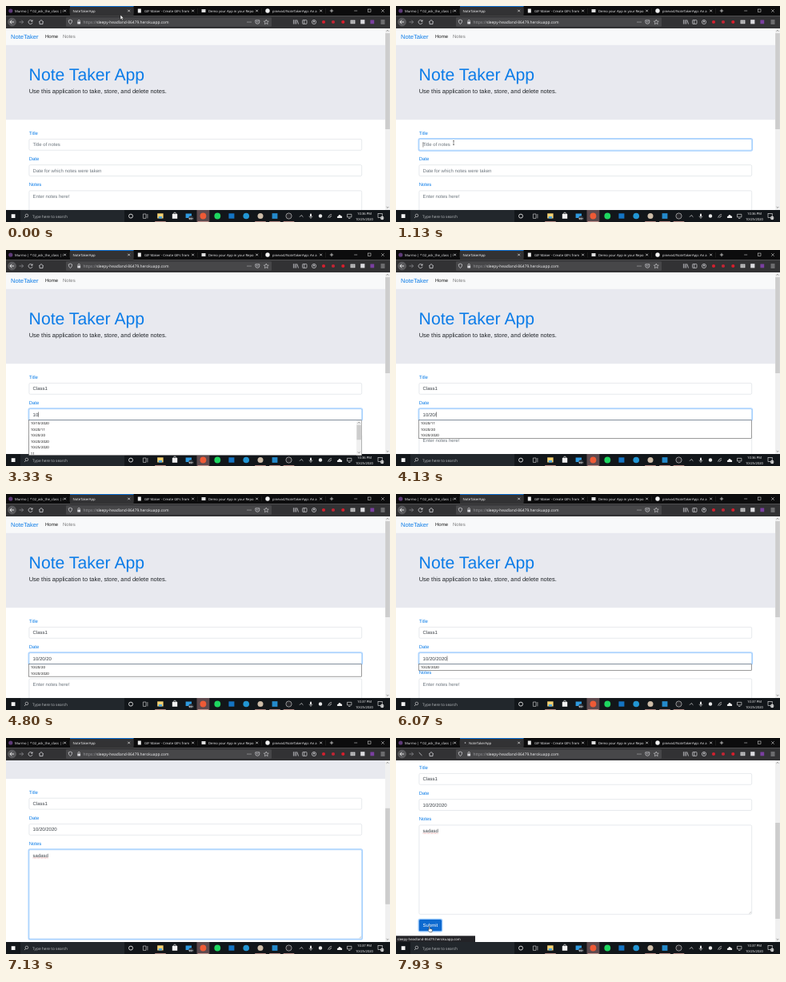
An HTML page for the animation above (8000 ms loop, 480 by 270 pixels).

```html
<!DOCTYPE html>
<html lang="en">
<head>
<meta charset="utf-8">
<title>Note Taker App</title>
<style>
  html, body { margin: 0; width: 100%; height: 100%; overflow: hidden; background: #fff; }
  svg { display: block; width: 100vw; height: 100vh; }
  text { font-family: "Liberation Sans", Arial, sans-serif; text-rendering: geometricPrecision; white-space: pre; }
  .ui { font-family: "Open Sans", "Noto Sans", sans-serif; }
</style>
</head>
<body>
<svg viewBox="0 0 480 270" xmlns="http://www.w3.org/2000/svg">
  <defs><clipPath id="view"><rect y="28" width="480" height="227"/></clipPath></defs>
  <g clip-path="url(#view)"><g id="page"></g></g>
  <g id="frame"></g>
  <g id="overlay"></g>
</svg>
<script>
const LOOP = 8000;
const BLUE = '#0b7ce8', TOOLBAR = '#323234', ICON = '#d7d7db';
const $ = id => document.getElementById(id);

// Drawing helpers
const rect = (x, y, w, h, fill, more = '') =>
  `<rect x="${x}" y="${y}" width="${w}" height="${h}" fill="${fill}" ${more}/>`;
const circle = (x, y, r, fill, more = '') => `<circle cx="${x}" cy="${y}" r="${r}" fill="${fill}" ${more}/>`;
const line = (d, color = ICON, width = 0.7, more = '') =>
  `<path d="${d}" fill="none" stroke="${color}" stroke-width="${width}" ${more}/>`;
const shape = (d, fill, more = '') => `<path d="${d}" fill="${fill}" ${more}/>`;
const text = (x, y, str, size, fill, more = '') =>
  `<text x="${x}" y="${y}" font-size="${size}" fill="${fill}" ${more}>${str}</text>`;
const ui = (x, y, str, size, fill, more = '') => text(x, y, str, size, fill, `class="ui" ${more}`);
const cross = (x, y, r, color, width) =>
  line(`M${x - r} ${y - r}l${2 * r} ${2 * r}m0 ${-2 * r}l${-2 * r} ${2 * r}`, color, width);

const pen = document.createElement('canvas').getContext('2d');
pen.font = '60px "Liberation Sans", Arial, sans-serif';
const textWidth = str => pen.measureText(str).width / 10;

// Timeline
const FIELDS = [
  { label: 'Title', hint: 'Title of notes', word: 'Class1', height: 14.25, lag: 0,
    keys: [1530, 1600, 1730, 1800, 1930, 2270], focus: [1070, 2630],
    history: ['Class', 'class', 'Class1'] },
  { label: 'Date', hint: 'Date for which notes were taken', word: '10/20/2020', height: 14.25, lag: 105,
    keys: [2870, 3300, 3530, 3730, 3870, 4000, 4200, 4270, 5000, 5070], focus: [2630, 6140],
    history: ['10/10/2020', '10/20/11', '10/20/20', '10/20/2020', '10/25/2020', '11'] },
  { label: 'Notes', hint: 'Enter notes here!', word: 'sadasd', height: 111.8,
    keys: [6270, 6330, 6400, 6470, 6530, 6600], focus: [6140, 7800] },
];
const CARET_OFF = [[2070, 2270], [4770, 5000], [5330, 5730], [6880, 7400]];
const POINTER = [
  [[0, 143, 11], [270, 143, 11], [400, 114, 129], [600, 114, 129], [950, 72, 171], [1530, 72, 171]],
  [[5530, 163, 82], [5730, 163, 82], [6065, 110, 222]],
  [[7470, 112, 150], [7720, 40, 235.3], [8000, 40, 235.3]],
];
const SUBMIT_AT = 7800, HOVER_AT = 7680, LOADING_AT = 7860, MINUTE_AT = 4400;

const within = (t, [from, to]) => t >= from && t < to;
const ease = p => p * p * (3 - 2 * p);
const clamp = p => Math.max(0, Math.min(1, p));
const scrollAt = t => 122 * ease(clamp((t - 6728) / 600));
const typed = (field, t) => field.word.slice(0, field.keys.filter(k => k <= t).length);

function pointerAt(t) {
  const path = POINTER.find(p => within(t, [p[0][0], p.at(-1)[0]]));
  if (!path) return null;
  const i = path.findIndex(p => p[0] > t);
  const [t0, x0, y0] = path[i - 1], [t1, x1, y1] = path[i];
  const p = ease((t - t0) / (t1 - t0));
  return [x0 + (x1 - x0) * p, y0 + (y1 - y0) * p];
}

// Web page
const fieldTop = i => 166.2 + 32.25 * i;

function drawField(field, i, t) {
  const top = fieldTop(i), value = typed(field, t), focused = within(t, field.focus);
  const base = top + 9.2;
  let out = text(28.7, top - 5.4, field.label, 6, BLUE);
  if (focused) out += rect(28.1, top - 0.6, 417.4, field.height + 1.2, 'none',
    'rx="2" stroke="#007bff" stroke-opacity=".32" stroke-width="1.2"');
  out += rect(28.9, top + 0.2, 415.8, field.height - 0.4, '#fff',
    `rx="1.5" stroke="${focused ? '#6db2fa' : '#ced4da'}" stroke-width=".5"`);
  out += text(33.6, base, value || field.hint, 6, value ? '#3c4248' : '#6c757d');
  if (focused && !CARET_OFF.some(span => within(t, span)))
    out += rect(33.7 + textWidth(value), top + 4, 0.5, 6.3, '#222');
  if (i === 2) {
    const bottom = top + field.height;
    out += line(`M441.5 ${bottom - 1}l2.5 -2.5m-1.2 2.5l1.2 -1.2`, '#888', 0.35);
    if (t > 7000) out += line(`M33.6 ${base + 1.2}h${textWidth(value)}`, '#c44', 0.5, 'stroke-dasharray=".8 .5"');
  }
  return out;
}

function drawPage(t) {
  const top = 349;
  return rect(0, 28, 474, 400, '#fff') +
    rect(0, 28, 474, 20.7, '#f8f9fa') +
    text(6, 41, 'NoteTaker', 7.55, BLUE) +
    text(49, 40.4, 'Home', 6, 'rgba(0,0,0,.9)') +
    text(71, 40.4, 'Notes', 6, 'rgba(0,0,0,.5)') +
    rect(0, 48.7, 474, 93.5, '#e8e9ef') +
    text(28.6, 92.8, 'Note Taker App', 21.2, BLUE) +
    text(28.7, 109.2, 'Use this application to take, store, and delete notes.', 7.5, '#212529') +
    FIELDS.map((f, i) => drawField(f, i, t)).join('') +
    (t >= SUBMIT_AT ? rect(28.1, top - 0.6, 29.6, 15.4, 'none', 'rx="2" stroke="#99caff" stroke-width="1.2"') : '') +
    rect(28.7, top, 28.4, 14.25, t >= HOVER_AT ? '#0d69cf' : BLUE, 'rx="1.5"') +
    text(42.9, top + 9.2, 'Submit', 6, '#fff', 'text-anchor="middle"');
}

function drawSuggestions(t) {
  return FIELDS.map((field, i) => {
    if (!field.history || !within(t, [field.keys[0], field.focus[1]])) return '';
    const query = typed(field, t - field.lag).toLowerCase();
    const rows = field.history.filter(h => h.toLowerCase().startsWith(query));
    const top = fieldTop(i) + 14.3, height = Math.min(rows.length * 7.5 + 0.4, 44);
    let out = rect(28.6, top, 416, height, '#fff', 'stroke="#4a4a4a" stroke-width=".55"');
    rows.forEach((row, n) => out += ui(30.8, top + 5.7 + 7.5 * n, row, 4.35, '#000'));
    if (rows.length > 5) out += rect(438, top + 0.3, 6.3, height - 0.6, '#f0f0f0') +
      rect(438.4, top + 6, 5.5, 18.5, '#cdcdcd') +
      line(`M439.8 ${top + 3.8}l1.4 -1.4l1.4 1.4M439.8 ${top + 39.6}l1.4 1.4l1.4 -1.4`, '#555', 0.6);
    return out;
  }).join('');
}

// Browser window and taskbar
const TABS = [
  ['Murmo | * 02_ask_the_class | H', circle(5.8, 6, 2.6, '#5d3a78')],
  ['NoteTakerApp', ''],
  ['GIF Maker - Create GIFs from', rect(164.8, 3.5, 4, 5, '#eee')],
  ['Demo your App in your Repo', rect(244.5, 4, 5, 4, '#ddd')],
  ['pinevo4/NoteTakerApp: An a', circle(327, 6, 2.7, '#f4f4f4')],
];

function drawBrowser() {
  let out = rect(0, 0, 480, 12.2, '#0c0c0d') + rect(0, 12.2, 480, 15.8, TOOLBAR) +
    rect(80, 0, 79.5, 12.5, TOOLBAR) + rect(80, 0, 79.5, 0.8, '#0a84ff');
  TABS.forEach(([title, icon], i) => {
    const x = 80 * i;
    if (i !== 1) out += icon + ui(x + (i ? 13 : 11), 7.6, title, 4.2, '#f2f2f4');
    out += rect(x + 71.5, 2, 7, 8, i === 1 ? TOOLBAR : '#0c0c0d') + cross(x + 73.6, 6, 1.3, '#eee', 0.7) +
      rect(x + 79.6, 3, 0.3, 6.5, '#444');
  });
  out += line('M404.8 6h4.4m-2.2 -2.2v4.4', '#eee') + line('M435.2 6h4', '#eee', 0.5) +
    rect(452.4, 4, 3.6, 3.6, 'none', 'stroke="#eee" stroke-width=".5"') + cross(471, 6, 1.8, '#eee', 0.5);

  // Navigation buttons and address
  out += circle(7.5, 20, 5, '#58585b', 'stroke="#77777a" stroke-width=".4"') +
    line('M10 20h-5m2.2 -2.3l-2.3 2.3l2.3 2.3', '#fff', 0.8) +
    line('M16.5 20h5m-2.2 -2.3l2.3 2.3l-2.3 2.3', '#8c8c90', 0.8) +
    line('M41 20.2l3 -2.7l3 2.7m-5 -.6v3h4v-3', ICON, 0.8) +
    rect(75, 14.2, 257, 11.6, '#474749', 'rx="1"') +
    line('M78.2 18l2.2 -.8l2.2 .8q0 3.4 -2.2 4.7q-2.2 -1.3 -2.2 -4.7z') +
    rect(89.3, 19.4, 3.8, 3, ICON, 'rx=".4"') + line('M90 19.5v-1q0 -1.1 1.2 -1.1t1.2 1.1v1') +
    ui(96.6, 21.7, 'https://<tspan fill="#f9f9fa">sleepy-headland-86479.herokuapp.com</tspan>', 4.9, '#a4a4a8') +
    [302, 304, 306].map(x => circle(x, 20, 0.55, ICON)).join('') +
    line('M311.8 17.8h5v2q0 2.5 -2.5 2.5t-2.5 -2.5zm1.2 1.2l1.3 1.2l1.3 -1.2') +
    shape('M325.3 17l.9 2l2.1 .2l-1.6 1.4l.5 2.1l-1.9 -1.1l-1.9 1.1l.5 -2.1l-1.6 -1.4l2.1 -.2z', 'none',
      `stroke="${ICON}" stroke-width=".6"`);

  // Toolbar buttons
  out += line('M359.4 17.2v5.4m1.7 -5.4v5.4m1.7 -5.4v5.4m1 -5.2l1.8 5.2') +
    rect(370.6, 17.6, 5.4, 4.8, 'none', `rx=".6" stroke="${ICON}" stroke-width=".7"`) + line('M372.7 17.6v4.8') +
    circle(385, 20, 2.6, 'none', `stroke="${ICON}" stroke-width=".7"`) + circle(385, 19.6, 1, ICON) +
    circle(397, 20, 2.1, '#d3202f') + circle(409, 20, 2.1, '#c22534') + circle(421.3, 20, 2.1, '#d81e2c') +
    rect(430.6, 17.6, 5.8, 4.6, '#d8d8da') + line('M432.5 17.6v4.6m2 -4.6v4.6m-3.9 -2.3h5.8', '#555', 0.4) +
    rect(443.2, 17.2, 5.2, 5.2, '#dcdce0') + rect(455.4, 17.5, 4.8, 4.8, '#7a3fa0') +
    line('M468.5 18h5m-5 2h5m-5 2h5');
  return out;
}

function drawTaskbar() {
  let out = rect(0, 255, 480, 15, '#12161a') + rect(18, 255, 130, 15, '#22272c') +
    rect(6.7, 260.2, 4.8, 4.8, '#f2f2f2') +
    circle(25.9, 261.9, 1.8, 'none', 'stroke="#ddd" stroke-width=".6"') + line('M24.6 263.3l-1.6 1.7', '#ddd') +
    ui(33, 264.7, 'Type here to search', 4.8, '#b9bcbf') +
    circle(156, 262.6, 2.5, 'none', 'stroke="#fff" stroke-width=".8"') +
    line('M171.4 260v5.4h3.6v-5.4zm5.5 0v5.4', '#ddd', 0.6) +
    rect(189.2, 259.3, 7.4, 6.2, '#f5d272') + rect(190.8, 263, 4.2, 2.5, '#4aa3df') +
    rect(207.8, 259.8, 6.4, 6, '#f0f0f0') + line('M209.5 259.8q0 -1.7 1.5 -1.7t1.5 1.7', '#f0f0f0') +
    rect(224.6, 259.5, 7.4, 5.5, '#2f9be0') + circle(231.3, 265.3, 3, '#2b3036') +
    ui(231.3, 266.7, '99+', 3.2, '#fff', 'text-anchor="middle" font-weight="700"') +
    rect(238.5, 255, 15.8, 15, '#5d4a4e') +
    circle(246.4, 262.5, 3.9, '#ee5a36') + circle(264.3, 262.5, 3.9, '#1ed760') +
    rect(278.4, 259.3, 7, 6.4, '#1474c4') + circle(300.2, 262.5, 3.8, '#2296d4') +
    circle(318, 262.5, 3.5, '#cdbca8') + rect(332.6, 259.1, 6.8, 6.8, '#2489ca') +
    circle(353.5, 262.5, 3.6, '#26262a', 'stroke="#c4c4c4" stroke-width=".7"');
  for (const x of [193, 246.4, 318, 336, 353.5]) out += rect(x - 6.8, 269.2, 13.6, 0.8, '#d9a49c');
  return out +
    line('M367 263.7l2.2 -2.2l2.2 2.2', '#eee') +
    rect(380, 259.6, 2, 4, '#eee', 'rx="1"') + line('M379 262.5q0 2 2 2t2 -2m-2 2v1.5', '#eee', 0.5) +
    circle(393, 262.5, 2.2, '#e8e8e8') +
    line('M402.8 264.8a4.3 4.3 0 0 1 4.3 -4.3m-2.4 4.3a2.3 2.3 0 0 1 2.4 -2.3', '#ddd') +
    shape('M414.4 265q-1.5 -2 1 -2.6q1.3 -2.6 3.3 -.2q2.2 .5 1.2 2.8z', '#eee') +
    line('M426.5 260.3h5.4v3.6h-5.4zm1.5 5.2h2.4', '#eee', 0.6) +
    rect(465, 259.6, 5.2, 4.8, 'none', 'stroke="#eee" stroke-width=".6"') +
    circle(470.2, 265, 2.2, '#dcdcdc') + ui(470.2, 266.3, '11', 3, '#111', 'text-anchor="middle"') +
    ui(448, 268, '10/25/2020', 4.15, '#fff', 'text-anchor="middle"');
}

function drawOverlay(t) {
  const scroll = scrollAt(t), loading = t >= LOADING_AT;
  let out = rect(474, 28, 6, 227, '#f0f0f0') + rect(474.2, 34 + scroll * 0.59, 5.6, 120, '#cdcdcd') +
    line('M475.6 31.7l1.4 -1.4l1.4 1.4M475.6 251l1.4 1.4l1.4 -1.4', '#505050', 0.6) +
    ui(448, 261, t < MINUTE_AT ? '10:36 PM' : '10:37 PM', 4.15, '#fff', 'text-anchor="middle"') +
    ui(loading ? 91 : 83.5, 7.6, 'NoteTakerApp', 4.25, '#f9f9fa');
  out += loading
    ? circle(86.5, 6, 0.8, '#c8c8cc') + line('M28.7 18.1l3.8 3.8', ICON, 0.8) +
      rect(0, 247.3, 99, 7.7, '#232327') + ui(1.5, 252.7, 'sleepy-headland-86479.herokuapp.com', 4.3, '#f9f9fa')
    : line('M32.6 18.6a2.5 2.5 0 1 0 .4 2.2', ICON, 0.8) + shape('M33.4 17v2.6h-2.6z', ICON);
  return out + drawSuggestions(t) + drawPointer(t, scroll);
}

function drawPointer(t, scroll) {
  const at = pointerAt(t);
  if (!at) return '';
  const [x, y] = at, pageY = y + scroll;
  const overField = x > 29 && FIELDS.some((f, i) => within(pageY, [fieldTop(i), fieldTop(i) + f.height]));
  const outline = 'stroke="#111" stroke-width=".45" stroke-linejoin="round"';
  const move = `transform="translate(${x} ${y})"`;
  if (t >= HOVER_AT)
    return shape('M1.2 .5q.7 -.7 1.2 0v2.6l2.6 .6q.6 .3 .4 1l-.5 2.6h-3l-2 -2.7q-.2 -.8 .6 -.7l.7 .5z', '#fff', `${outline} ${move}`);
  if (overField) return line('M-1 -2.5h2m-1 0v5m-1 0h2', '#222', 0.5, move);
  return shape('M0 0v6l1.4 -1.2l1 2.2l1 -.5l-1 -2.1h1.8z', '#fff', `${outline} ${move}`);
}

$('frame').innerHTML = drawBrowser() + drawTaskbar();
const start = performance.now();

function render() {
  const t = (performance.now() - start) % LOOP;
  $('page').innerHTML = drawPage(t);
  $('page').setAttribute('transform', `translate(0 ${-scrollAt(t)})`);
  $('overlay').innerHTML = drawOverlay(t);
  requestAnimationFrame(render);
}
render();
</script>
</body>
</html>
```
